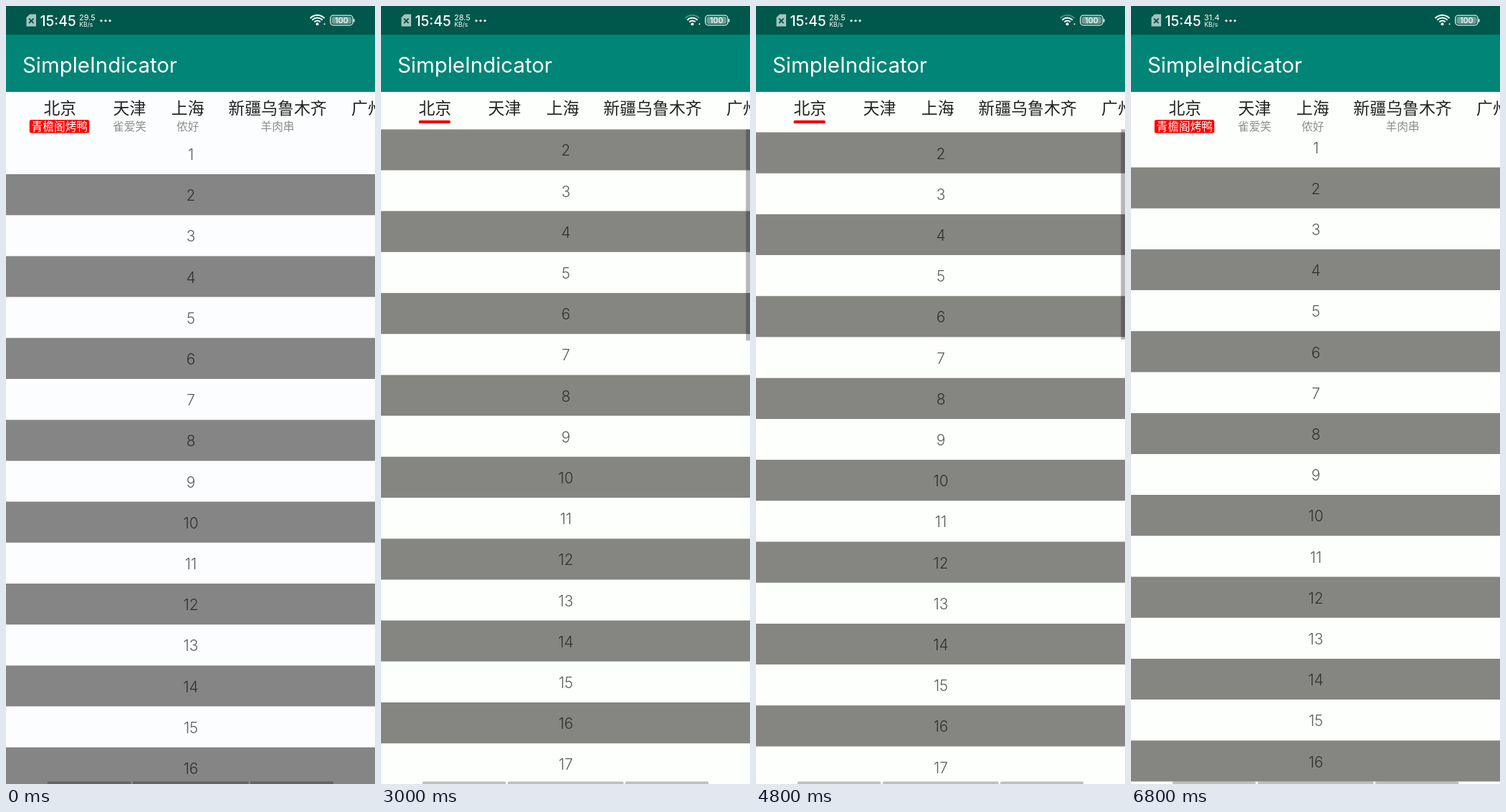
Animation, 515 px wide and 1087 px high, one loop 6.9 s. Source, as an HTML page with a canvas:

```html
<!DOCTYPE html>
<html lang="zh-CN">
<head>
<meta charset="utf-8">
<title>SimpleIndicator</title>
<style>
html, body { margin: 0; width: 100%; height: 100%; overflow: hidden; background: #fdfffc; }
canvas { display: block; width: 515px; height: 1087px; }
</style>
</head>
<body>
<canvas id="stage"></canvas>
<script>
const W = 515, H = 1087, LOOP = 6900, STEP = 100, ROW = 57.2;
const LATIN = 'Inter, Roboto, sans-serif';
const CJK = '"Noto Sans CJK SC", "Noto Sans CJK", sans-serif';
const canvas = document.getElementById('stage');
const ctx = canvas.getContext('2d');
const dpr = window.devicePixelRatio || 1;
canvas.width = W * dpr;
canvas.height = H * dpr;

// [time, top of the second row]
const path = [
  [1300, 235], [2100, 203], [2800, 171.5], [3000, 172.2], [3700, 213.5], [3900, 217],
  [4000, 217], [4300, 205.5], [5000, 171.5], [5300, 172.6], [6000, 223.5], [6100, 225.5]
];

const tabs = [
  ['北京', 75.3, '青檐阁烤鸭'], ['天津', 172.5, '雀爱笑'], ['上海', 253.7, '侬好'],
  ['新疆乌鲁木齐', 379, '羊肉串'], ['广州', 505, '']
];

function slope(i) {
  if (i <= 0 || i >= path.length - 1) return 0;
  const [a, b, c] = path.slice(i - 1, i + 2);
  const l = (b[1] - a[1]) / (b[0] - a[0]);
  const r = (c[1] - b[1]) / (c[0] - b[0]);
  return l * r > 0 ? 2 * l * r / (l + r) : 0;
}

// Monotone cubic through the points of the drag
function rowTop(t) {
  const last = path.length - 1;
  if (t <= path[0][0]) return path[0][1];
  if (t >= path[last][0]) return path[last][1];
  const i = path.findIndex(p => p[0] > t) - 1;
  const [t0, y0] = path[i], [t1, y1] = path[i + 1];
  const d = t1 - t0, u = (t - t0) / d, v = 1 - u;
  return y0 * v * v * (1 + 2 * u) + y1 * u * u * (3 - 2 * u)
    + d * u * v * (slope(i) * v - slope(i + 1) * u);
}

function box(x, y, w, h, color, r = 0) {
  ctx.fillStyle = color;
  ctx.beginPath();
  ctx.roundRect(x, y, w, h, r);
  ctx.fill();
}

function text(s, x, y, font, color, align = 'left') {
  ctx.font = font;
  ctx.fillStyle = color;
  ctx.textAlign = align;
  ctx.fillText(s, x, y);
}

function dot(x, y, r, color) {
  ctx.fillStyle = color;
  ctx.beginPath();
  ctx.arc(x, y, r, 0, Math.PI * 2);
  ctx.fill();
}

function drawSim() {
  ctx.fillStyle = '#a5c3be';
  ctx.beginPath();
  ctx.moveTo(33, 11.5);
  ctx.lineTo(42, 11.5);
  ctx.lineTo(42, 28.5);
  ctx.lineTo(28.5, 28.5);
  ctx.lineTo(28.5, 16);
  ctx.closePath();
  ctx.fill();
  ctx.strokeStyle = '#00574b';
  ctx.lineWidth = 1.8;
  ctx.beginPath();
  ctx.moveTo(32, 17.5);
  ctx.lineTo(38.5, 24);
  ctx.moveTo(38.5, 17.5);
  ctx.lineTo(32, 24);
  ctx.stroke();
}

function drawWifi(weak) {
  const x = 434.5, y = 26;
  ctx.lineWidth = 2;
  [5.5, 9.5, 13.3].forEach((r, i) => {
    ctx.strokeStyle = weak && i === 2 ? 'rgba(255,255,255,.3)' : '#fff';
    ctx.beginPath();
    ctx.arc(x, y, r, -Math.PI * 0.77, -Math.PI * 0.23);
    ctx.stroke();
  });
  dot(x, y - 0.8, 2, '#fff');
  dot(444.5, 25.3, 1, '#fff');
}

function drawBattery() {
  ctx.strokeStyle = '#e4efed';
  ctx.lineWidth = 1.3;
  ctx.beginPath();
  ctx.roundRect(452.7, 13.2, 31.3, 13.6, 4);
  ctx.stroke();
  box(454.5, 15, 27.7, 10, '#6f9d96', 2.5);
  box(484.8, 18, 1.7, 4.5, '#e4efed', 1);
  text('100', 468.3, 24.2, '500 11px ' + LATIN, '#fff', 'center');
}

function drawBars(t) {
  const weak = t >= 2800 && t < 5800;
  const rate = t < 2800 ? '29.5' : weak ? '28.5' : '31.4';
  box(0, 0, W, 40, '#00574b');
  box(0, 40, W, 80, '#008577');
  drawSim();
  text('15:45', 47.5, 28, '500 19.5px ' + LATIN, '#fff');
  text(rate, 102, 20, '400 11px ' + LATIN, '#fff');
  text('KB/s', 102.3, 28.5, '400 8.6px ' + LATIN, '#fff');
  [133, 139, 145].forEach(x => dot(x, 20.5, 1.6, '#fff'));
  drawWifi(weak);
  drawBattery();
  text('SimpleIndicator', 23, 92.5, '400 29.4px ' + LATIN, '#fff');
}

function drawTabs(folded, paper) {
  box(0, 120, W, folded ? 52.3 : 64, paper);
  if (folded) box(52.5, 159.7, 44.5, 4.4, '#f00505', 2.2);
  else box(32.8, 159, 83.5, 18.5, '#fe0000', 2.5);
  tabs.forEach(([name, x, note], i) => {
    text(name, x, 151.3, '400 22.9px ' + CJK, '#202220', 'center');
    if (!folded) {
      text(note, i ? x : 74.8, 174, '300 15.7px ' + CJK, i ? '#8d8f8c' : '#fff', 'center');
    }
  });
}

function drawRows(top, gray) {
  for (let n = 1; n < 19; n++) {
    const y = top + (n - 2) * ROW;
    if (n % 2 === 0) box(0, y, W, ROW, gray);
    text(String(n), 258, y + 37.2, '300 20.8px ' + LATIN, 'rgba(0,0,0,.64)', 'center');
  }
}

function draw(time) {
  const t = Math.floor(time % LOOP / STEP) * STEP;
  const still = t < 1400;
  const paper = still ? '#fcfdfe' : '#fdfffc';
  const top = rowTop(t);
  ctx.setTransform(dpr, 0, 0, dpr, 0, 0);
  box(0, 0, W, H, paper);
  drawRows(top, still ? '#858585' : '#858682');

  // The thumb fades once the list has come to rest
  const fade = still ? 0 : Math.max(0, Math.min(1, (6800 - t) / 300));
  const end = 449 + (225.5 - top) * 0.345;
  box(509.3, 120, W - 509.3, end - 120, `rgba(0,0,0,${0.28 * fade})`);

  [[58, 116], [177, 161.5], [341, 116]].forEach(([x, w]) =>
    box(x, 1083.6, w, 4, 'rgba(0,0,0,.25)', [1.5, 1.5, 0, 0]));
  drawTabs(top < 184, paper);
  drawBars(t);
}

const start = performance.now();
function tick() {
  draw(performance.now() - start);
  requestAnimationFrame(tick);
}
tick();
</script>
</body>
</html>
```
